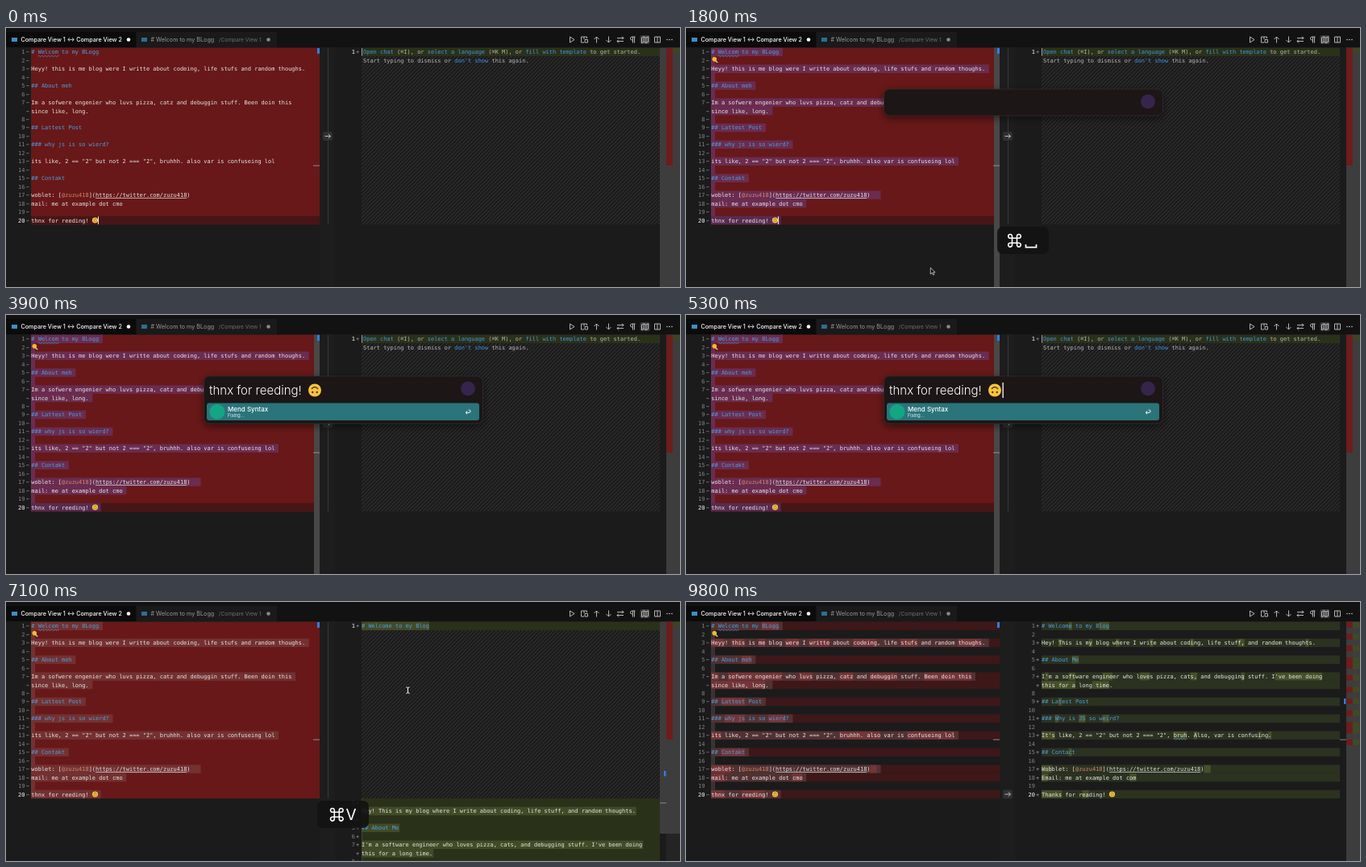
An HTML page for the animation above (10 s loop, 836 by 322 pixels).

```html
<!DOCTYPE html>
<html lang="en">
<head>
<meta charset="utf-8">
<title>Compare view</title>
<style>
html, body { margin: 0; width: 100%; height: 100%; overflow: hidden; background: #1b1b1b; }
svg { display: block; }
text { white-space: pre; font-family: Inter, "Noto Sans", sans-serif; }
.code { font: 6.97px "DejaVu Sans Mono", "Liberation Mono", monospace; }
.icon { fill: none; stroke: #c8c8c8; stroke-width: .9; }
</style>
</head>
<body>
<svg id="stage" width="836" height="322"></svg>
<script>
const PITCH = 10.46, CHAR = 4.196, ROWS = 21;
const LEFT = 31.3, RIGHT = 441;
const BLUE = '#4b9fdf', WHITE = '#e6e6e6', DIM = '#858585';

// Braces mark the words that differ between the two versions.
const before = [
  '# Welcom to my {BLogg}', '',
  '{Heyy}! {this} is {me} blog {were} I {writte} about {codeing}, life {stufs} and random {thoughs}.', '',
  '## About {meh}', '',
  '{Im} a {sofwere engenier} who {luvs} pizza, {catz} and {debuggin} stuff. {Been doin this}',
  '{since like, long}.', '',
  '## {Lattest} Post', '',
  '### {why js} is so {wierd}?', '',
  '{its} like, 2 == "2" but not 2 === "2", {bruhhh. also} var is {confuseing lol}', '',
  '## {Contakt}', '',
  '{woblet}: [@zuzu418](https://twitter.com/zuzu418){  }',
  '{mail}: me at example dot {cmo}', '',
  '{thnx} for {reeding}! '
];
const after = [
  '# Welcom{e} to my B{log}', '',
  'Hey! {T}his is m{y} blog w{h}ere I wri{t}e about cod{i}ng, life stuf{f,} and random though{t}s.', '',
  '## About {Me}', '',
  "I{'}m a so{ft}ware eng{ine}er who l{ove}s pizza, cat{s,} and debuggin{g} stuff. I{'ve been doing}",
  '{this for a} long{ time}.', '',
  '## La{t}est Post', '',
  '### {W}hy is {JS} so w{ei}rd?', '',
  '{It\'s} like, 2 == "2" but not 2 === "2", {bruh}. {A}lso, var is confus{i}ng{.}', '',
  '## Conta{c}t', '',
  '{Wob}blet: [@zuzu418](https://twitter.com/zuzu418){  }',
  '{Em}ail: me at example dot c{om}', '',
  '{Thanks} for r{ea}ding! '
];

const plain = s => s.replace(/[{}]/g, '');
const rowY = r => 24.6 + r * PITCH;
const rect = (x, y, w, h, fill, more = '') =>
  `<rect x="${x}" y="${y}" width="${w}" height="${h}" fill="${fill}" ${more}/>`;
const text = (x, y, s, fill, more = '') => `<text x="${x}" y="${y}" fill="${fill}" ${more}>${s}</text>`;
const code = (x, r, s, fill, more = '') => text(x, rowY(r) + 7.7, s, fill, `class="code" ${more}`);
const path = (d, more = 'class="icon"') => `<path d="${d}" ${more}/>`;
const circle = (x, y, r, fill) => `<circle cx="${x}" cy="${y}" r="${r}" fill="${fill}"/>`;
const group = (id, ...parts) => `<g id="${id}">${parts.flat().join('')}</g>`;
const stroke = (color, w) => `fill="none" stroke="${color}" stroke-width="${w}"`;
const squiggle = (x, y, n) => path(`M${x} ${y}q1 -1.6 2 0` + 't2 0'.repeat(n), stroke('#4b9fdf', .7));
const number = r => r < 7 ? r + 1 : r === 7 ? '' : r;

function line(x, r, s) {
  s = plain(s);
  if (s[0] === '#') return code(x, r, s, BLUE, 'font-weight="bold"');
  return code(x, r, s
    .replace(/https[^)]+/, m => `<tspan text-decoration="underline">${m}</tspan>`)
    .replace(/@\w+/, m => `<tspan fill="#d08a70">${m}</tspan>`), WHITE);
}
const gutter = (x, r, bright) =>
  code(x, r, number(r), bright ? '#fff' : DIM, 'text-anchor="end"');
const sign = (x, r, s) => code(x, r, s, '#a0a0a0');

// Changed rows, with the differing words brighter.
function diff(lines, x, w, rowFill, wordFill) {
  return lines.map((s, r) => {
    if (!s) return '';
    let out = rect(x, rowY(r), w, PITCH, rowFill), col = 0;
    s.split(/[{}]/).forEach((part, i) => {
      if (i % 2) out += rect(x + col * CHAR, rowY(r) + .4, part.length * CHAR, PITCH - .8, wordFill);
      col += part.length;
    });
    return out;
  });
}
const extents = (lines, x, extra) => lines.map((s, r) =>
  rect(x, rowY(r), plain(s).length * CHAR + extra + (r === 20 ? 6 : 0), PITCH, 'currentColor'));

function face(x, y, r) {
  return `<g transform="translate(${x} ${y}) scale(${r / 8})">` + circle(0, 0, 8, '#f8c440') +
    circle(-2.7, 2.5, 1.2, '#5a3a10') + circle(2.7, 2.5, 1.2, '#5a3a10') +
    path('M-4 -1.5Q0 -6.5 4 -1.5', stroke('#5a3a10', 1.3)) + '</g>';
}
const command = (x, y) => `<g transform="translate(${x} ${y})" ${stroke('#fff', 1.6)}>` +
  [0, 90, 180, 270].map(a => `<path d="M-3 -3H3M-3 -3V-5.3A2.4 2.4 0 1 0 -5.4 -3Z" transform="rotate(${a})"/>`).join('') + '</g>';
const arrowButton = (id, y) => group(id,
  rect(393, y - 5.5, 12, 11, '#303030', 'rx="2"'),
  path(`M395.5 ${y}h7m-2.7 -2.7l2.7 2.7l-2.7 2.7`));
const ruler = (lines, x, fill) =>
  lines.map((s, r) => s ? rect(x, 25 + 7.3 * r, 8, 7, fill) : '');

const link = s => `<tspan fill="#4196e0">${s}</tspan>`;
const italic = 'font-style="italic"';

const header = [
  rect(0, 0, 836, 24, '#121212'), rect(0, 5, 161, 19, '#0b0b0b'), rect(162, 5, 174, 19, '#1a1a1a'),
  rect(7, 12, 7, 5, '#3d8fc4'), rect(168, 12, 7, 5, '#2f6d94'),
  text(18.5, 17, 'Compare View 1 ↔ Compare View 2', '#fff', 'font-size="7.2" font-weight="500"'),
  circle(152, 14.5, 2.3, '#fff'),
  text(179.5, 17, '# Welcom to my BLogg', '#9a9a9a', 'font-size="7.2"'),
  text(264, 17, '/Compare View 1', '#6e6e6e', 'font-size="6.6"'),
  circle(325.5, 14.5, 2.3, '#8a8a8a'),
  rect(786.5, 9, 12, 11, '#3a3a3a', 'rx="2"'),
  path('M699.5 11l5.5 3.5l-5.5 3.5z'),
  path('M720.5 13V11H713.5V18H717M717 11V14M718 14.5h3.5v3.5h-3.5z'),
  path('M732.5 18.5v-7.5m-3 3l3 -3l3 3M747.5 10.5v7.5m-3 -3l3 3l3 -3'),
  path('M758 12.5h8m-2 -2l2 2l-2 2M766 16.5h-8m2 -2l-2 2l2 2'),
  path('M780.5 11h-4a2 2 0 0 0 0 4h.5M777.5 11v7.5M779.5 11v7.5'),
  path('M788.5 12l2.7 -1.2l2.7 1.2l2.7 -1.2v6.5l-2.7 1.2l-2.7 -1.2l-2.7 1.2zM791.2 11v6.3M793.9 12v6.3'),
  path('M804.5 11h7v7h-7zM808 11v7'),
  [820, 823, 826].map(x => circle(x, 14.5, .8, '#c8c8c8'))
];

const leftPane = [
  group('fullLeft', rect(31, rowY(0), 358, ROWS * PITCH, '#681818'),
    before.map((_, r) => sign(24.8, r, '−'))),
  group('diffLeft', diff(before, 31, 358, '#3e1719', '#691d1f'),
    before.map((s, r) => s ? sign(24.8, r, '−') : '')),
  group('currentLeft', rect(31, rowY(20), 358, PITCH, '#481517')),
  group('selection', extents(before, 31, 5)),
  before.map((s, r) => gutter(23.5, r, r === 20) + line(LEFT, r, s)),
  squiggle(39.7, 35, 12), face(110.5, 239, 3.6),
  group('bulb', circle(35.3, 38.8, 2.8, '#f5b92e'), path('M36.6 40.7l2.6 2.3', stroke('#d9d0b0', 1.5))),
  group('caretLeft', rect(114, 234.3, .9, 9.8, '#fff')),
  group('hoverLeft', rect(382, 24.5, 7, 298, '#4a4747')),
  rect(386, 25, 3, 7, '#2f7fe0'), rect(381, 170.7, 8, .8, '#b0a0a0')
];

const rightPane = [
  rect(389, 24, 19, 298, '#1d1d1d'),
  group('seam', rect(399, 25, 1, 219, '#383838')),
  arrowButton('arrowHigh', 134.5), arrowButton('arrowLow', 239),
  group('hatch', rect(RIGHT, rowY(1), 370, 20 * PITCH, 'url(#stripes)')),
  group('ghost',
    rect(RIGHT, rowY(0), 370, PITCH, '#2a3119'), sign(434, 0, '+'),
    code(443, 0, `${link('Open chat')} (⌘I), or ${link('select a language')} (⌘K M), or ${link('fill with template')} to get started.`, '#b4b4b4', italic),
    code(443, 1, `Start typing to dismiss or ${link("don't show")} this again.`, '#b4b4b4', italic),
    rect(441.2, 25, .8, 9.6, '#bbb')),
  group('rawFirst', rect(RIGHT, rowY(0), 370, PITCH, '#2a3119'),
    rect(RIGHT, rowY(0), 84, PITCH, '#424b27')),
  group('diffRight', diff(after, RIGHT, 370, '#2b3220', '#465029')),
  group('rest',
    group('rawRest', rect(RIGHT, rowY(1), 370, 20 * PITCH, '#2a3119'),
      after.map((s, r) => r ? rect(RIGHT, rowY(r), plain(s).length * CHAR + 1, PITCH, '#424b27') + sign(434, r, '+') : '')),
    group('diffSigns', after.map((s, r) => s && r ? sign(434, r, '+') : '')),
    after.map((s, r) => r ? gutter(433, r, r === 20) + line(RIGHT, r, s) : ''),
    face(528.5, 239, 3.6)),
  group('title', sign(434, 0, '+'), line(RIGHT, 0, after[0])),
  group('oneBright', gutter(433, 0, true)), group('oneDim', gutter(433, 0, false)),
  group('bruh', squiggle(604.6, 170.5, 7)),
  group('caretRight', rect(532.2, 234.3, .9, 9.8, '#fff')),
  rect(819, 24, 17, 298, '#242424'),
  rect(819, 24.5, 17, 298, '#3d3d3d', 'class="slider"'),
  group('hoverRight', rect(811, 24.5, 8, 298, '#3d3d3d', 'class="slider"')),
  group('rulerFull', rect(819, 25, 8, 146, '#6e1c1c'), rect(827, 25, 9, 5, '#3b4620')),
  group('rulerDiff', ruler(before, 819, '#6e1c1c'), ruler(after, 827, '#3f4a25')),
  group('markRaw', rect(816, 210, 2.5, 6.5, '#2f7fe0'), rect(811, 249.5, 8, .8, '#999')),
  group('markDiff', rect(816, 120, 2.5, 7, '#2f7fe0'), rect(811, 170.7, 8, .8, '#999'))
];

const launcher = group('launcher',
  `<rect id="panel" x="245.5" y="76" width="346" rx="7" fill="#1b1313" stroke="#383030" stroke-width=".7" filter="url(#shadow)"/>`,
  circle(573, 91.5, 9, '#35254a'),
  `<text id="query" x="252" y="99" fill="#fff" font-size="15" font-weight="300"></text>`,
  group('bigFace', face(383, 93.5, 8)),
  `<rect id="caretQuery" y="84" width="1.3" height="19" fill="#fff"/>`,
  group('result', rect(249, 109.5, 338, 21.5, '#2a747a', 'rx="3"'),
    circle(262, 120.2, 9.5, '#12a683'),
    text(275, 119.8, 'Mend Syntax', '#fff', 'font-size="8" font-weight="500"'),
    `<text id="note" x="275" y="127" fill="#e4eeee" font-size="5.6"></text>`,
    path('M570.5 121.3h4a1.5 1.5 0 0 0 0 -3.2h-.8M572.2 119.4l-2 1.9l2 1.9', stroke('#fff', 1))));

const el = id => document.getElementById(id);
const show = (on, ...ids) => ids.forEach(id => el(id).style.display = on ? '' : 'none');

el('stage').innerHTML = `<defs>
  <pattern id="stripes" width="4.7" height="4.7" patternUnits="userSpaceOnUse">
    <path d="M-1 1L1 -1M0 4.7L4.7 0M3.7 5.7L5.7 3.7" stroke="#444" stroke-width=".75"/></pattern>
  <filter id="shadow" x="-10%" y="-40%" width="120%" height="190%">
    <feDropShadow dx="0" dy="3" stdDeviation="5" flood-opacity=".5"/></filter></defs>` +
  rect(0, 0, 836, 322, '#1b1b1b') +
  [leftPane, rightPane, header].flat(3).join('') + launcher +
  group('keys', rect(386, 247, 64, 34, '#121212', 'rx="7" opacity=".9"'),
    group('space', command(407.5, 264.3), path('M421.5 269v3.6h13v-3.6', stroke('#fff', 1.7))),
    group('paste', command(410.3, 264.3), text(428, 271, 'V', '#fff', 'font-size="19" text-anchor="middle"'))) +
  group('pointer', path('M303.3 298v8l1.9 -1.7l1.3 2.8l1.4 -.7l-1.3 -2.7h2.5z', 'fill="#111" stroke="#eee" stroke-width=".7"')) +
  group('beam', path('M496.5 106q2 0 2 1.3q0 -1.3 2 -1.3M498.5 107v5.5M496.5 113.5q2 0 2 -1.3q0 1.3 2 1.3', stroke('#fff', 1)));

const sliders = document.querySelectorAll('.slider');

function draw(t) {
  const within = (a, b) => t >= a && t < b;
  const pasted = t >= 6800, aligned = t >= 7400, raw = pasted && !aligned;
  const blink = Math.floor(t / 500) % 2 === 0;
  const fixing = t >= 3300;

  show(!aligned, 'fullLeft', 'rulerFull', 'seam', 'hatch', 'oneBright');
  show(aligned, 'diffLeft', 'diffRight', 'diffSigns', 'rulerDiff', 'markDiff', 'oneDim', 'bruh', 'arrowLow');
  show(!pasted, 'ghost', 'arrowHigh');
  show(pasted, 'rest', 'title');
  show(raw, 'rawFirst', 'rawRest', 'markRaw');
  el('rest').setAttribute('transform', `translate(0 ${aligned ? 0 : 20 * PITCH})`);

  show(t >= 500, 'selection', 'bulb');
  el('selection').style.color = t < 6300 ? 'rgba(110,70,150,.45)' : 'rgba(150,130,130,.24)';
  show(t < 6300, 'currentLeft');
  show(!fixing && (blink || t > 1600), 'caretLeft');
  show(aligned && blink, 'caretRight');
  show(within(600, 6200), 'hoverLeft');
  show(t < 600 || within(6200, 9000), 'hoverRight');
  sliders.forEach(s => s.setAttribute('height', raw ? 263.5 : 298));

  const query = fixing ? 'thnx for reeding!' : t < 2300 ? '' : t < 2500 ? 'g' : 'gr';
  show(within(1700, 5700), 'launcher');
  show(query, 'result');
  show(fixing, 'bigFace');
  show(blink, 'caretQuery');
  el('panel').setAttribute('height', query ? 59 : 33);
  el('query').textContent = query;
  el('note').textContent = fixing ? 'Fixing...' : 'Preview';
  el('caretQuery').setAttribute('x', fixing ? 392.5 : 253 + query.length * 8);

  show(within(1700, 3300) || within(6800, 9100), 'keys');
  show(!pasted, 'space');
  show(pasted, 'paste');
  show(within(600, 2500), 'pointer');
  show(within(6200, 7400), 'beam');
}

function tick() {
  draw(performance.now() % 10000);
  requestAnimationFrame(tick);
}
tick();
</script>
</body>
</html>
```
